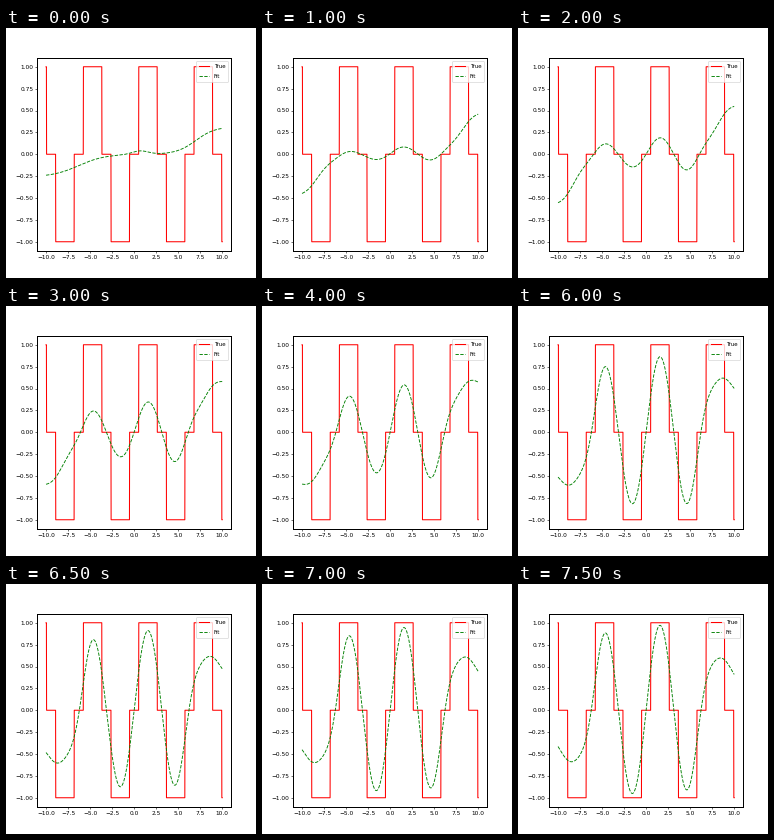
These frames come from a looping animation (250 px wide and 250 px high, 8 s). A matplotlib script:

```python
import numpy as np
import matplotlib.pyplot as plt
from matplotlib.animation import FuncAnimation

FRAMES, INTERVAL = 16, 500

plt.rcParams.update({
    "font.family": "DejaVu Sans",
    "xtick.labelsize": 8.5, "ytick.labelsize": 8.5,
    "ytick.major.size": 2.7, "ytick.major.pad": 2.7,
    "axes.linewidth": 1.44,
    "legend.fontsize": 8, "legend.handlelength": 1.95,
    "legend.handletextpad": .78, "legend.labelspacing": 1,
    "legend.borderpad": .5,
})


def logistic(u):
    return 1 / (1 + np.exp(-u))


def start_curve(x):
    """Untrained fit: two soft ramps and a low bump."""
    return (.315 * logistic((x - 7) / 1.1)
            - .26 * logistic(-(x + 6.3) / 1.5)
            + .04 * np.exp(-((x - .7) / 1.3) ** 2))


def learned_curve(x, step):
    """Sine growing in the middle, with tails that rise and then relax."""
    lag = .5 - .6 * np.tanh(x / 2)
    growth = 1.03 * logistic((step - lag - 7.6) / 2.6)
    window = .3 + .7 * logistic((6.3 - np.abs(x)) / .7)
    tails = logistic((x - 8.4) / .75) - logistic((-x - 8.4) / .75)
    pull = .75 - .0031 * (step - 9) ** 2
    return growth * window * np.sin(x) + pull * tails


def fit_curve(x, step):
    memory = np.exp(-step / 1.5)
    return memory * start_curve(x) + (1 - memory) * learned_curve(x, step)


x = np.linspace(-10, 10, 1000)
fig, ax = plt.subplots(figsize=(5, 5), dpi=50)
ax.plot(x, np.round(np.sin(x)), "r", label="True")
fit_line, = ax.plot(x, fit_curve(x, 0), "g--", linewidth=1.3, label="Fit")
ax.legend(loc="upper right")


def update(step):
    fit_line.set_ydata(fit_curve(x, step))
    return fit_line,


anim = FuncAnimation(fig, update, frames=FRAMES, interval=INTERVAL, repeat=True)
plt.show()
```
